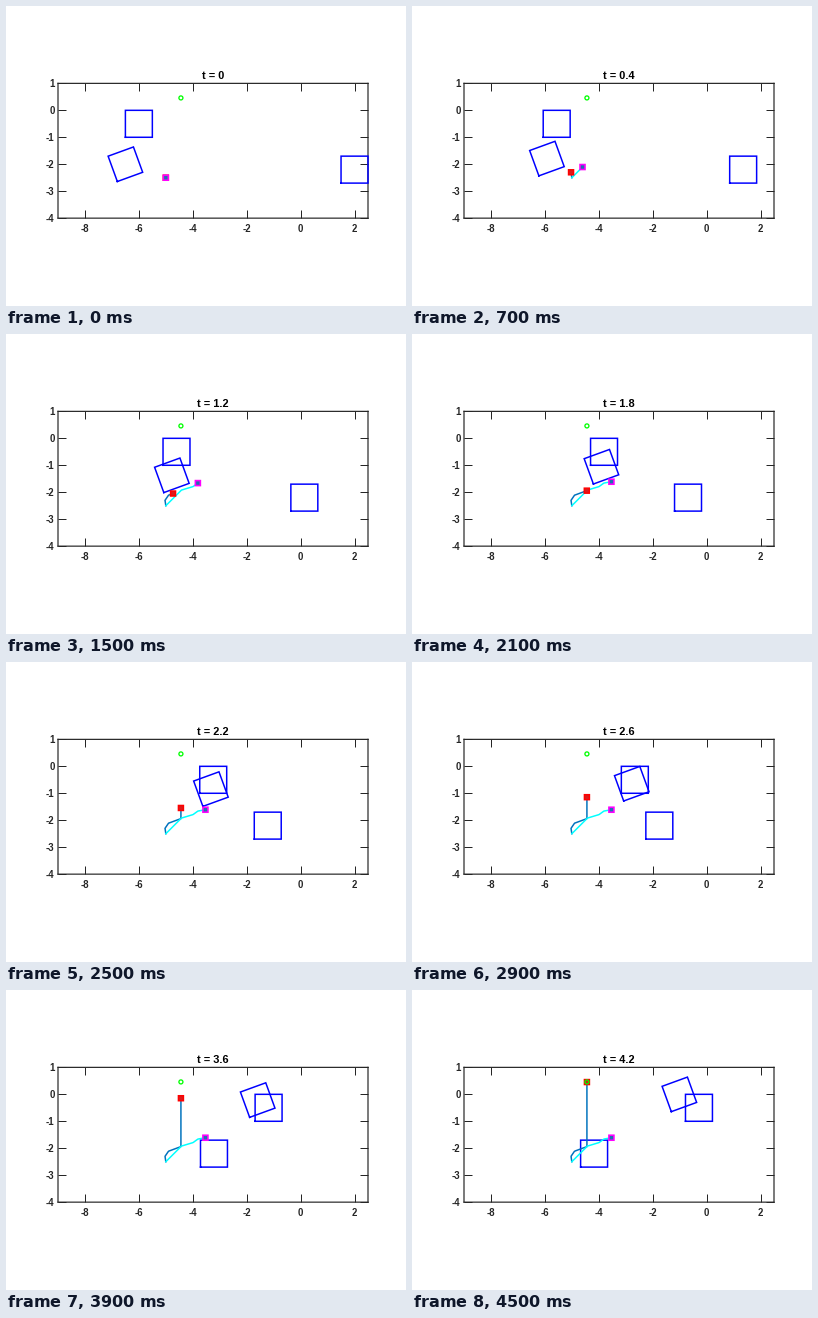
Animation of 400x300 px, one loop 5500 ms. Source, as a matplotlib script:

```python
import numpy as np
import matplotlib.pyplot as plt
from matplotlib.animation import FuncAnimation

plt.rcParams["font.family"] = "Liberation Sans"
plt.rcParams["font.weight"] = "bold"

W, H, DPI = 400, 300, 100
PX = 72 / DPI              # points per pixel
UNIT = 310 / 11.5          # pixels per data unit
STEP, END = 0.2, 4.2
INK = "#262626"

GOAL = (-4.44, 0.46)
CHASER = [(-5, -2.5), (-5.03, -2.3), (-4.9, -2.11), (-4.44, -1.94), GOAL]
RUNNER = [(-5, -2.5), (-4.42, -1.92), (-3.99, -1.79), (-3.81, -1.66),
          (-3.53, -1.61)]

# Obstacles: centre, tilt in degrees, speed, acceleration, sway
OBSTACLES = [
    ((-6.0, -0.5), 0, 1.13, 0.055, -0.04),
    ((-6.5, -2.0), 20, 1.58, -0.065, -0.08),
    ((2.0, -2.2), 0, -1.47, 0, -0.10),
]


def chaser_dist(t):
    """Slow while dodging, then twice as fast straight to the goal."""
    return 0.51 * min(t, 1.8) + max(t - 1.8, 0)


def runner_dist(t):
    """Ease out to a halt after 1.6 s."""
    return 1.775 * (1 - max(1 - t / 1.6, 0) ** 1.32)


def trail(points, dist):
    """Polyline walked up to the given arc length."""
    pts = np.array(points)
    legs = np.hypot(*np.diff(pts, axis=0).T)
    arc = np.concatenate([[0], np.cumsum(legs)])
    s = np.linspace(0, dist, 80)
    return np.interp(s, arc, pts[:, 0]), np.interp(s, arc, pts[:, 1])


def square(centre, tilt, speed, accel, sway, t):
    """Closed outline of a unit square drifting along its tilt."""
    a = np.radians(tilt)
    dx = speed * t + accel * t**2 + sway * np.sin(2 * np.pi * t / END)
    u = np.array([-0.5, 0.5, 0.5, -0.5, -0.5])
    v = np.array([-0.5, -0.5, 0.5, 0.5, -0.5])
    x = centre[0] + dx + u * np.cos(a) - v * np.sin(a)
    y = centre[1] + dx * np.tan(a) + u * np.sin(a) + v * np.cos(a)
    return x, y


fig = plt.figure(figsize=(W / DPI, H / DPI), dpi=DPI, facecolor="white")
ax = fig.add_axes([0.13, 87.85 / H, 0.775, 5 * UNIT / H])
ax.set(xlim=(-9, 2.5), ylim=(-4, 1), xticks=range(-8, 3, 2),
       yticks=range(-4, 2))
ax.xaxis.set_major_formatter(lambda v, _: f"{v:.0f}")
ax.yaxis.set_major_formatter(lambda v, _: f"{v:.0f}")
ax.tick_params(direction="in", top=True, right=True, length=8 * PX,
               width=1 * PX, color=INK, labelcolor=INK, labelsize=9.6 * PX)
ax.tick_params(axis="x", pad=5.5 * PX)
ax.tick_params(axis="y", pad=3.5 * PX)
for spine in ax.spines.values():
    spine.set(linewidth=1.2 * PX, color=INK, snap=False)

title = ax.text(0.5, 1 + 4 / (5 * UNIT), "", transform=ax.transAxes,
                ha="center", va="baseline", fontsize=11 * PX, color="black")


def line(color, z):
    return ax.plot([], [], color=color, lw=1.5 * PX, zorder=z, snap=False,
                   clip_on=False, solid_joinstyle="miter")[0]


def dot(size, edge, face, width, z):
    """Square marker that can sit between pixels."""
    side = size / UNIT
    return ax.add_patch(plt.Rectangle((0, 0), side, side, ec=edge, fc=face,
                                      lw=width * PX, zorder=z, snap=False,
                                      clip_on=False))


def place(mark, x, y):
    half = mark.get_width() / 2
    mark.set_xy((x - half, y - half))


boxes = [line("#0000ff", 3) for _ in OBSTACLES]
agents = [
    (CHASER, chaser_dist, line("#0072bd", 4),
     dot(5, "#ff0000", "#d81c1c", 1.5, 6)),
    (RUNNER, runner_dist, line("cyan", 5),
     dot(5, "#ff00ff", "#1f6fb0", 1.6, 7)),
]
ax.add_patch(plt.Circle(GOAL, 2 / UNIT, ec="#00ff00", fc="none",
                        lw=1.3 * PX, zorder=8))


def draw(i):
    t = min(max((i - 3) // 2 * STEP, 0), END)
    title.set_text(f"t = {t:.2g}")
    for box, spec in zip(boxes, OBSTACLES):
        box.set_data(*square(*spec, t))
    for points, dist, path, mark in agents:
        x, y = trail(points, dist(t))
        path.set_data(x, y)
        place(mark, x[-1], y[-1])
    return [title, *boxes]


anim = FuncAnimation(fig, draw, frames=55, interval=100, repeat=True,
                     repeat_delay=0, blit=False)
plt.show()
```
